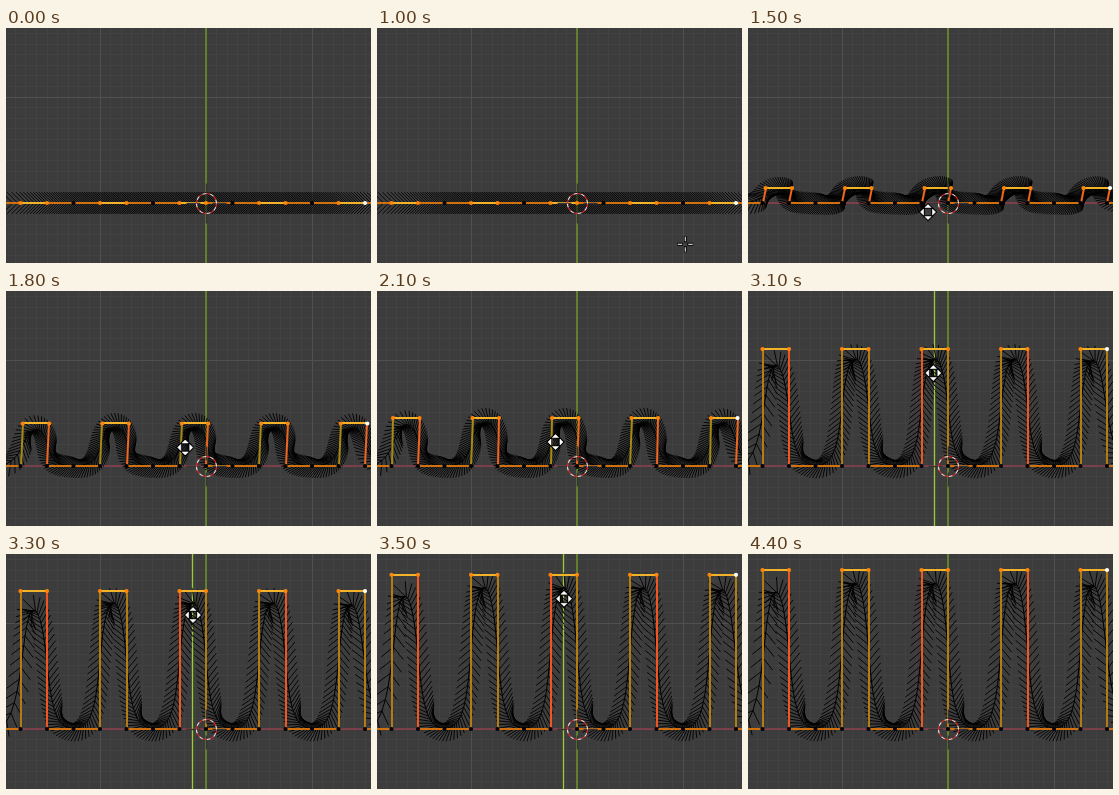
Recreate the animation shown at these times as an HTML page with a canvas. Size 365 by 235 pixels, loop 4.6 s.

```html
<!DOCTYPE html>
<html lang="en">
<head>
<meta charset="utf-8">
<title>Curve extrude</title>
<style>
html, body { margin: 0; width: 100%; height: 100%; overflow: hidden; background: #3c3c3c; }
canvas { display: block; }
</style>
</head>
<body>
<canvas id="view" width="365" height="235"></canvas>
<script>
const ctx = document.getElementById('view').getContext('2d');
const W = 365, H = 235, LOOP = 4600, TICK = 100;
const OX = 200, OY = 175, UNIT = 106, STEP = UNIT / 4;
const DEGREE = 4, RESOLUTION = 12, NORMAL = 11;
const ENTER = 900, EXTRUDE = 1400, LOCK = 2800, CONFIRM = 3900, LEAVE = 4400;

const clamp = (v, lo, hi) => Math.min(hi, Math.max(lo, v));
const ease = (t, from, to, power = 1) => 1 - (1 - clamp((t - from) / (to - from), 0, 1)) ** power;

function pose(t) {
  const height = 45 * ease(t, EXTRUDE, 1900, 1.8) + 27 * ease(t, 2000, 2400, .4)
    - 6 * ease(t, 2600, 2700) + 93 * ease(t, 2700, 3600, 1.35);
  const sway = 3 * ease(t, EXTRUDE, 1500) - 1.5 * ease(t, 1500, 2100);
  const entry = ease(t, ENTER, 1300);
  return {
    height,
    shift: t < LOCK ? sway : 0,
    x: 352 - 175 * entry + sway + 8.5 * ease(t, 2700, 3200) + 169 * ease(t, CONFIRM, 4300),
    y: 222 - 23 * entry - height
  };
}

function line(points, color, width = 1) {
  ctx.beginPath();
  points.forEach(([x, y]) => ctx.lineTo(x, y));
  ctx.strokeStyle = color;
  ctx.lineWidth = width;
  ctx.stroke();
}

function dot([x, y], color) {
  ctx.beginPath();
  ctx.arc(x, y, 2.1, 0, 7);
  ctx.fillStyle = color;
  ctx.fill();
}

function gridLines(step, color) {
  for (let x = OX % step; x < W; x += step) line([[Math.floor(x) + .5, 0], [Math.floor(x) + .5, H]], color);
  for (let y = OY % step; y < H; y += step) line([[0, Math.floor(y) + .5], [W, Math.floor(y) + .5]], color);
}

function drawGrid(locked) {
  ctx.fillStyle = '#3c3c3c';
  ctx.fillRect(0, 0, W, H);
  gridLines(UNIT / 10, '#424242');
  gridLines(UNIT, '#505050');
  line([[0, OY], [W, OY]], '#8b3c48', 1.4);
  line([[OX, 0], [OX, H]], '#6b9223', 1.5);
  if (locked) line([[186.5, 0], [186.5, H]], '#9ccc35', 1.3);
}

// Four units long, 17 points; two of every three are extruded
function buildHull(shift, height, extruded) {
  const hull = [];
  for (let i = -1; i <= 15; i++) {
    const x = OX + (i - 7) * STEP, side = (i + 3) % 3;
    const chosen = i <= 13 && side < 2;
    const base = { at: [x, OY], selected: chosen && !extruded, i };
    const top = { at: [x + shift, OY - height], selected: true, i };
    if (!chosen || !extruded) hull.push(base);
    else hull.push(...(side ? [top, base] : [base, top]));
  }
  return hull;
}

// De Boor evaluation with clamped ends
function splinePoint(points, u) {
  const spans = points.length - DEGREE;
  const knot = i => clamp(i - DEGREE, 0, spans);
  const first = Math.min(Math.floor(u), spans - 1);
  const d = points.slice(first, first + DEGREE + 1);
  for (let r = 1; r <= DEGREE; r++)
    for (let j = DEGREE; j >= r; j--) {
      const lo = knot(first + j), hi = knot(first + j + 1 + DEGREE - r);
      const f = (u - lo) / (hi - lo);
      d[j] = d[j].map((v, axis) => d[j - 1][axis] * (1 - f) + v * f);
    }
  return d[DEGREE];
}

// Curve with a backward chevron at every sample
function drawCurve(hull) {
  const points = hull.map(p => p.at);
  const count = RESOLUTION * (points.length - 1);
  const path = Array.from({ length: count }, (_, k) =>
    splinePoint(points, k / (count - 1) * (points.length - DEGREE)));
  line(path, '#000');
  path.forEach(([x, y], k) => {
    const a = path[Math.max(k - 1, 0)], b = path[Math.min(k + 1, count - 1)];
    const scale = NORMAL / Math.hypot(b[0] - a[0], b[1] - a[1]);
    const dx = (b[0] - a[0]) * scale, dy = (b[1] - a[1]) * scale;
    line([[x - dx - dy, y - dy + dx], [x, y], [x - dx + dy, y - dy - dx]], '#000', .9);
  });
}

function sideColor(i, right, locked, height) {
  if (locked) return (Math.floor(i / 3) * 2 + right) % 3 === 1 ? '#f0561f' : '#b27c10';
  return right || height < 30 ? '#f0661f' : '#a68a14';
}

function drawHull(hull, locked, height) {
  const snap = p => p.at.map(Math.round);
  hull.slice(1).forEach((b, j) => {
    const a = hull[j];
    const color = a.i === b.i ? sideColor(a.i, a.selected, locked, height)
      : a.selected && b.selected ? '#f2b32a' : '#d0700f';
    line([snap(a), snap(b)], color, 2);
  });
  hull.forEach(p => dot(p.at, !p.selected ? '#000' : p.i === 13 ? '#fff' : '#ff8508'));
}

function draw3DCursor() {
  ctx.save();
  ctx.translate(OX + .5, OY + .5);
  for (let k = 0; k < 4; k++) {
    ctx.rotate(Math.PI / 2);
    line([[6, 0], [20, 0]], '#353535', 1.5);
  }
  for (let k = 0; k < 16; k++) {
    ctx.beginPath();
    ctx.arc(0, 0, 10, k * Math.PI / 8, (k + 1) * Math.PI / 8);
    ctx.strokeStyle = k % 2 ? '#f4dede' : '#e8261e';
    ctx.lineWidth = 1.1;
    ctx.stroke();
  }
  ctx.restore();
}

function drawPointer(x, y, moving) {
  ctx.save();
  ctx.translate(x, y);
  for (let k = 0; k < 4; k++) {
    ctx.rotate(Math.PI / 2);
    if (moving) {
      const arrow = [[-3, -4.5], [0, -7.5], [3, -4.5], [-3, -4.5]];
      line(arrow, '#000', 2.6);
      ctx.fillStyle = '#fff';
      ctx.fill();
      line(arrow, '#fff', .6);
    } else {
      line([[0, -2], [0, -8]], '#000', 3);
      line([[0, -3], [0, -7.5]], '#fff');
    }
  }
  ctx.restore();
}

function render(now) {
  const t = Math.floor(now % LOOP / TICK) * TICK;
  const { height, shift, x, y } = pose(t);
  const hull = buildHull(shift, height, t >= EXTRUDE);
  drawGrid(t >= LOCK && t < CONFIRM);
  drawCurve(hull);
  drawHull(hull, t >= LOCK, height);
  draw3DCursor();
  if (t >= ENTER && t < LEAVE) drawPointer(x, y, t >= EXTRUDE && t < CONFIRM);
  requestAnimationFrame(() => render(performance.now() - start));
}

const start = performance.now();
render(0);
</script>
</body>
</html>
```
